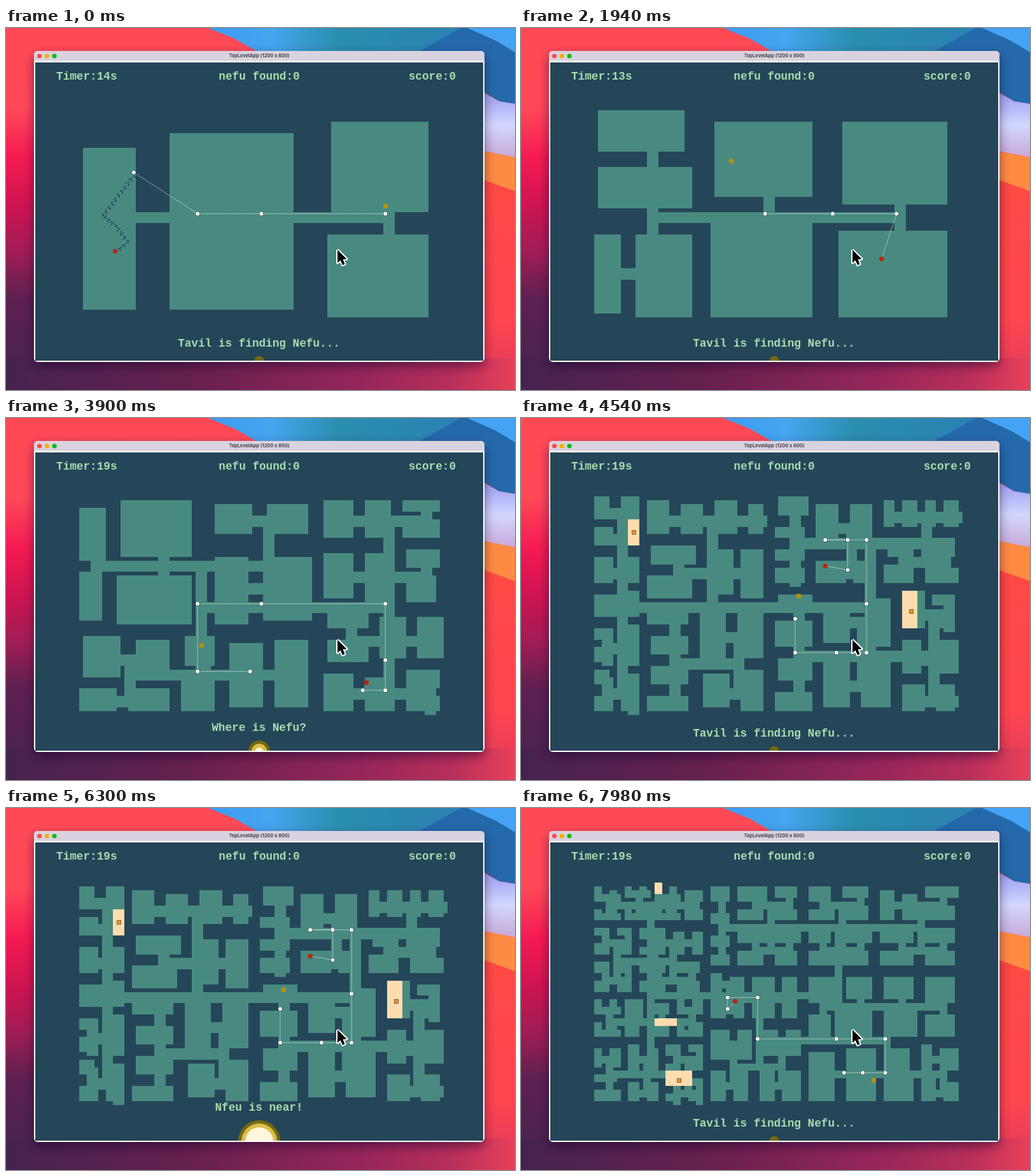
Animation of 800x568 px, one loop 8000 ms. Source, as an HTML page with a canvas:

```html
<!DOCTYPE html>
<html lang="en">
<head>
<meta charset="utf-8">
<title>Dungeon levels</title>
<style>
  html, body { margin: 0; width: 100%; height: 100%; overflow: hidden; }
  canvas { display: block; }
</style>
</head>
<body>
<canvas id="stage" width="800" height="568"></canvas>
<script>
const ctx = document.getElementById('stage').getContext('2d');
const LOOP = 8000, STEP = 1200, TILE = 5.9;
const px = i => 44.5 + TILE * i;
const py = j => 52.5 + TILE * j;
const mid = ([i, j]) => [px(i + .5), py(j + .5)];

// A level is a binary tree of areas. Cuts are listed from the root down:
// positive cuts at that column, negative at that row; the rest are near halves.
const levels = [
  { until: 1450, timer: 14, depth: 2, cuts: [76, 31, -42],
    route: [1, 2], player: [21, 50], seeker: [93, 38], start: [26, 29],
    trail: [[201, 232], [153, 294], [175, 313], [191, 336], [174, 351]] },
  { until: 2430, timer: 13, depth: 3, cuts: [41, -40, 74, -26, 21, -38, -41],
    route: [6, 5], player: [88, 52], seeker: [48, 26], round: true },
  { until: 3410, timer: 19, depth: 4,
    cuts: [51, -40, 78, 30, 32, -40, -37, -23, 42, -55, -56, 62, 62, 89, 91],
    route: [11, 14], player: [59, 30], seeker: [83, 42] },
  { until: 4490, timer: 19, depth: 5,
    cuts: [76, -47, -41, 46, 38, -24, -57, 20, -24, -61, 50, 97, 97, 91, 98],
    route: [29, 10], player: [88, 61], seeker: [44, 51] },
  { until: 7100, timer: 19, depth: 6,
    cuts: [59, 25, -36, -45, -40, 88, 93, -26, -57, -23, 39, 70, -21, 72, -48], deepCuts: { 24: -27, 27: -53 },
    route: [50, 55], player: [73, 30], seeker: [66, 38],
    vaults: [[21, 18, 24, 25], [94, 37, 98, 47]], guards: [[22, 21], [96, 42]] },
  { until: LOOP, timer: 19, depth: 7, hall: 2,
    cuts: [42, -41, -34, -22, -53, 68, 68, 27, 23, 26, 30, 49, 87, -48, -53], deepCuts: { 27: 53, 30: 98, 55: -41, 61: 88 },
    route: [112, 123], player: [49, 42], seeker: [86, 63],
    vaults: [[28, 11, 30, 14], [28, 47, 34, 49], [31, 61, 38, 65]], guards: [[34, 63]] }
];

const random = seed => { const v = Math.sin(seed * 12.9898) * 43758.5453; return v - Math.floor(v); };
const center = ([x1, y1, x2, y2]) => [(x1 + x2) >> 1, (y1 + y2) >> 1];
const parent = k => (k - 1) >> 1;

function roomIn([x1, y1, x2, y2], k) {
  const inset = (size, part, n) => Math.round(.5 + size * part * (.6 + .8 * random(k * 4 + n)));
  const w = x2 - x1, h = y2 - y1;
  return [x1 + inset(w, .07, 0), y1 + inset(h, .14, 1), x2 - inset(w, .12, 2), y2 - inset(h, .06, 3)];
}

function build(level) {
  const cuts = { ...level.cuts, ...level.deepCuts }, hall = level.hall || 3;
  level.areas = [];
  level.floor = [];
  (function divide(k, area, depth) {
    const [x1, y1, x2, y2] = area, w = x2 - x1, h = y2 - y1;
    level.areas[k] = area;
    if (depth === level.depth || (!cuts[k] && Math.max(w, h) < 8)) {
      level.floor.push(roomIn(area, k));
      return;
    }
    const ratio = .45 + .1 * random(k + .5);
    const cut = cuts[k] || (w > h ? Math.round(x1 + w * ratio) : -Math.round(y1 + h * ratio));
    const first = cut > 0 ? [x1, y1, cut, y2] : [x1, y1, x2, -cut];
    const second = cut > 0 ? [cut, y1, x2, y2] : [x1, -cut, x2, y2];
    divide(2 * k + 1, first, depth + 1);
    divide(2 * k + 2, second, depth + 1);
    const [ax, ay] = center(first), [bx, by] = center(second);
    level.floor.push([ax, ay, bx + hall, by + hall]);
  })(0, [11, 11, 110, 70], 0);

  // The route climbs from both ends to the shared ancestor.
  let [a, b] = level.route;
  const head = [], tail = [];
  while (a !== b) {
    if (a > b) { head.push(a); a = parent(a); }
    else { tail.unshift(b); b = parent(b); }
  }
  const nodes = [...head, a, ...tail].map(k => center(level.areas[k]));
  level.path = [level.start || level.player, ...nodes].map(mid);
}
levels.forEach(build);

function fillTiles(color, areas) {
  ctx.fillStyle = color;
  for (const [x1, y1, x2, y2] of areas) {
    const x = Math.round(px(x1)), y = Math.round(py(y1));
    ctx.fillRect(x, y, Math.round(px(x2)) - x, Math.round(py(y2)) - y);
  }
}
function square(color, x, y, size) {
  ctx.fillStyle = color;
  ctx.fillRect(Math.round(x - size / 2), Math.round(y - size / 2), size, size);
}
function disc(color, x, y, r) {
  ctx.fillStyle = color;
  ctx.beginPath();
  ctx.arc(x, y, r, 0, 7);
  ctx.fill();
}
function shape(color, points) {
  ctx.fillStyle = color;
  ctx.beginPath();
  points.forEach(p => ctx.lineTo(...p));
  ctx.fill();
}
function gradient(x1, y1, x2, y2, ...stops) {
  const g = ctx.createLinearGradient(x1, y1, x2, y2);
  stops.forEach(([at, color]) => g.addColorStop(at, color));
  return g;
}
function label(text, x, y, align) {
  ctx.font = 'bold 17.7px "Courier New", "Liberation Mono", monospace';
  ctx.fillStyle = '#a6dcaf';
  ctx.textAlign = align;
  ctx.fillText(text, x, y);
}

function drawWallpaper() {
  ctx.fillStyle = gradient(0, 0, 0, 568, [0, '#ff4a55'], [.22, '#ff4858'], [.36, '#f51a52'],
    [.5, '#cb1452'], [.62, '#a01d55'], [.75, '#5c2051'], [1, '#45234f']);
  ctx.fillRect(0, 0, 400, 568);
  ctx.fillStyle = gradient(0, 200, 0, 568, [0, '#ff4a42'], [.7, '#ff4550'], [1, '#dc3a5a']);
  ctx.fillRect(400, 0, 400, 568);
  ctx.fillStyle = gradient(0, 0, 800, 0, [0, '#45234f'], [.35, '#64204f'], [.7, '#96265a'], [.88, '#b82f5a'], [1, '#e8405a']);
  ctx.fillRect(0, 518, 800, 50);
  shape(gradient(330, 0, 680, 0, [0, '#3d9cf2'], [.25, '#45a5ee'], [.55, '#2a8fae'], [1, '#2a83b2']),
    [[318, 0], [740, 0], [680, 40], [400, 40], [360, 17]]);
  shape('#2469aa', [[715, 0], [800, 0], [800, 119], [775, 115], [752, 101], [660, 60], [650, 36]]);
  shape('#45a3f5', [[725, 0], [800, 0], [800, 38], [770, 20]]);
  shape(gradient(0, 101, 0, 203, [0, '#9c9cf0'], [.5, '#d2d7ff'], [1, '#c7a9d8']),
    [[750, 101], [775, 115], [800, 119], [800, 203], [750, 193]]);
  shape('#ff8b42', [[750, 193], [800, 203], [800, 256], [750, 238]]);
}

function drawWindow() {
  ctx.save();
  ctx.shadowColor = 'rgba(20, 0, 40, .5)';
  ctx.shadowBlur = 18;
  ctx.shadowOffsetY = 7;
  ctx.fillStyle = '#fff';
  ctx.beginPath();
  ctx.roundRect(44, 36, 708, 488, 6);
  ctx.fill();
  ctx.restore();
  ctx.fillStyle = '#d9d2df';
  ctx.beginPath();
  ctx.roundRect(44, 36, 708, 15.5, [6, 6, 0, 0]);
  ctx.fill();
  ['#ff4a45', '#f4b000', '#08be10'].forEach((color, k) => disc(color, 52.5 + 11.8 * k, 44, 3.6));
  ctx.font = 'bold 7.4px Inter, sans-serif';
  ctx.fillStyle = '#46424a';
  ctx.textAlign = 'center';
  ctx.fillText('TopLevelApp (1200 x 800)', 398, 46.4);
  ctx.fillStyle = '#254658';
  ctx.fillRect(46, 54, 704, 468);
}

function drawTrail(points) {
  for (let k = 1; k < points.length; k++) {
    const [x1, y1] = points[k - 1], [x2, y2] = points[k];
    const count = Math.round(Math.hypot(x2 - x1, y2 - y1) / 2);
    for (let n = 0; n < count; n++) {
      const u = n / count;
      square('#24485a', x1 + (x2 - x1) * u + 3 * Math.sin(n * 1.6), y1 + (y2 - y1) * u, 2);
    }
  }
}

function drawPath(points) {
  ctx.strokeStyle = 'rgba(240, 250, 245, .85)';
  ctx.lineWidth = 1;
  ctx.setLineDash([1.5, 1]);
  ctx.beginPath();
  points.forEach(p => ctx.lineTo(...p));
  ctx.stroke();
  ctx.setLineDash([]);
  for (const [x, y] of points) {
    disc('#3b4a48', x, y, 3.5);
    disc('#fff', x, y, 2.9);
  }
}

function drawActors(level, elapsed) {
  for (const [x, y] of (level.guards || []).map(mid)) {
    square('#66645c', x, y, 7);
    square('#f79410', x, y, 5);
  }
  const [i, j] = level.seeker;
  const [x, y] = mid([i, j + Math.floor(elapsed / STEP)]);
  if (level.round) disc('#b5900f', x, y, 4);
  else square('#b98f0d', x, y, 7);
  disc('#bd250c', ...mid(level.player), 3.6);
}

const pulse = (t, peak) => Math.max(0, 1 - ((t - peak) / 280) ** 2);

function drawVoice(t) {
  const r = 8 + 9 * pulse(t, 3900) + 25 * pulse(t, 6300);
  ctx.save();
  ctx.beginPath();
  ctx.rect(46, 54, 704, 468);
  ctx.clip();
  disc('#766811', 398, 523, r);
  if (r > 10) {
    disc('#d9be4b', 398, 523, r - 5);
    disc('#fff6dc', 398, 523, Math.max(0, r - 11));
  }
  ctx.restore();
  const text = r > 25 ? 'Nfeu is near!' : r > 12 ? 'Where is Nefu?' : 'Tavil is finding Nefu...';
  label(text, 397.5, 508 - r, 'center');
}

function drawCursor() {
  ctx.strokeStyle = '#fff';
  ctx.lineWidth = 4;
  ctx.lineJoin = 'round';
  shape('#000', [[521, 348], [521, 368.5], [525.5, 364.5], [529, 372], [532.5, 370.5], [529.5, 363], [535.5, 362.5], [521, 348]]);
  ctx.stroke();
  ctx.fill();
}

function frame(now) {
  const t = now % LOOP;
  const index = levels.findIndex(l => t < l.until), level = levels[index];
  const begin = index ? levels[index - 1].until : 0;
  drawWallpaper();
  drawWindow();
  fillTiles('#488a80', level.floor);
  fillTiles('#ffdcae', level.vaults || []);
  drawTrail(level.trail || []);
  drawPath(level.path);
  drawActors(level, t - begin);
  label(`Timer:${level.timer}s`, 79, 81, 'left');
  label('nefu found:0', 398, 81, 'center');
  label('score:0', 707, 81, 'right');
  drawVoice(t);
  drawCursor();
  requestAnimationFrame(frame);
}
requestAnimationFrame(frame);
</script>
</body>
</html>
```
